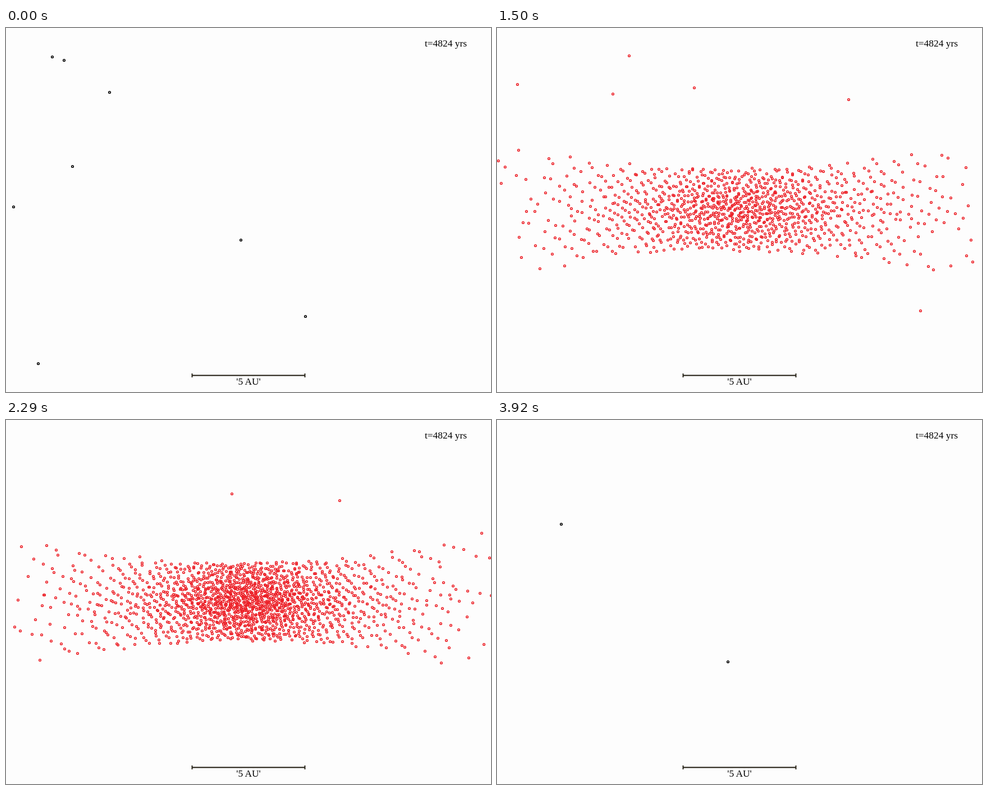
These frames come from a looping animation (864x648 px, 3.96 s). An HTML page with a canvas:

```html
<!DOCTYPE html>
<html lang="en">
<head>
<meta charset="utf-8">
<title>Slices through a disc</title>
<style>
  html, body { margin: 0; width: 100%; height: 100%; overflow: hidden; background: #fdfdfd; }
  canvas, svg { position: absolute; left: 0; top: 0; }
  text { font: 17.4px "Liberation Serif", "Times New Roman", serif; fill: #000; }
</style>
</head>
<body>
<canvas id="stage" width="864" height="648"></canvas>
<svg width="864" height="648">
  <path d="M331.5 618.5H532.5M331.5 615v7M532.5 615v7" fill="none" stroke="#1c180c" stroke-width="1.8"/>
  <text x="432" y="635" text-anchor="middle">'5 AU'</text>
  <text x="821" y="33" text-anchor="end">t=4824 yrs</text>
</svg>
<script>
const LOOP = 3960, STEP = 1000 / 24, LAST = 94;
const CX = 432, CZ = 323, MID = 47;   // disc centre and the slice that cuts it
const GAP = 14, RADIUS = 500, CORE = 14, DENSITY = 77000;
const ctx = document.getElementById('stage').getContext('2d');

function random(seed) {
  let a = seed * 7919 + 17;
  return () => {
    a = a + 0x6D2B79F5 | 0;
    let t = Math.imul(a ^ a >>> 15, 1 | a);
    t ^= t + Math.imul(t ^ t >>> 7, 61 | t);
    return ((t ^ t >>> 14) >>> 0) / 4294967296;
  };
}

function ring(color) {
  const c = document.createElement('canvas'), g = c.getContext('2d');
  c.width = c.height = 7;
  g.strokeStyle = color;
  g.lineWidth = 1.5;
  g.arc(3.5, 3.5, 1.85, 0, 7);
  g.stroke();
  return c;
}
const red = ring('#ec2027'), black = ring('#000');

function dot(img, x, z) {
  ctx.drawImage(img, Math.round(x) - 3, Math.round(z) - 3);
}

// Surface density falls as 1 / r² and fades out at the rim; thickness flares outwards
function drawDisc(y, rnd) {
  if (Math.abs(y) >= RADIUS) return;
  const d = Math.hypot(y, CORE);
  const span = Math.atan(Math.sqrt(RADIUS ** 2 - y * y) / d);
  const count = DENSITY * 2 / d * span;
  const jitter = () => (rnd() - 0.5) * 6;
  let a = rnd(), b = rnd();
  for (let i = 0; i < count; i++) {
    // Low-discrepancy steps keep the particles evenly spread
    a = (a + 0.7548777) % 1;
    b = (b + 0.5698403) % 1;
    const x = d * Math.tan((a * 2 - 1) * span) + jitter();
    const r2 = x * x + y * y;
    if (rnd() < (r2 / RADIUS ** 2) ** 2) continue;
    const height = 64 + (x > 0 ? 0.00034 : 0.0003) * r2;
    const u = b * 2 - 1;
    dot(red, CX + x, CZ + height * u * (0.7 + 0.3 * u * u) + jitter());
  }
}

// Loose particles, fewer and closer to the plane in later slices
function drawStrays(n, y, rnd) {
  if (n > 0 && n < 6) return;
  const count = Math.max(2, Math.min(8 + n / 4, 29 - n / 2));
  const late = Math.max(0, n - 50);
  for (let i = 0; i < Math.floor(count); i++) {
    const x = 10 + rnd() * 840;
    const z = 325 - late + (rnd() * 2 - 1) * (315 - 3.7 * late);
    dot(Math.abs(y) > 300 ? black : red, x, z);
  }
}

function draw(n) {
  const rnd = random(n + 1), y = (n - MID) * GAP;
  ctx.fillStyle = '#fdfdfd';
  ctx.fillRect(0, 0, 864, 648);
  drawDisc(y, rnd);
  drawStrays(n, y, rnd);
}

let shown = -1;
function tick() {
  // Slices change on a 10 ms grid at 24 per second
  const t = Math.floor(performance.now() % LOOP / 10) * 10;
  const n = Math.min(LAST, Math.floor((t + 5.01) / STEP));
  if (n !== shown) draw(shown = n);
  requestAnimationFrame(tick);
}
tick();
</script>
</body>
</html>
```
